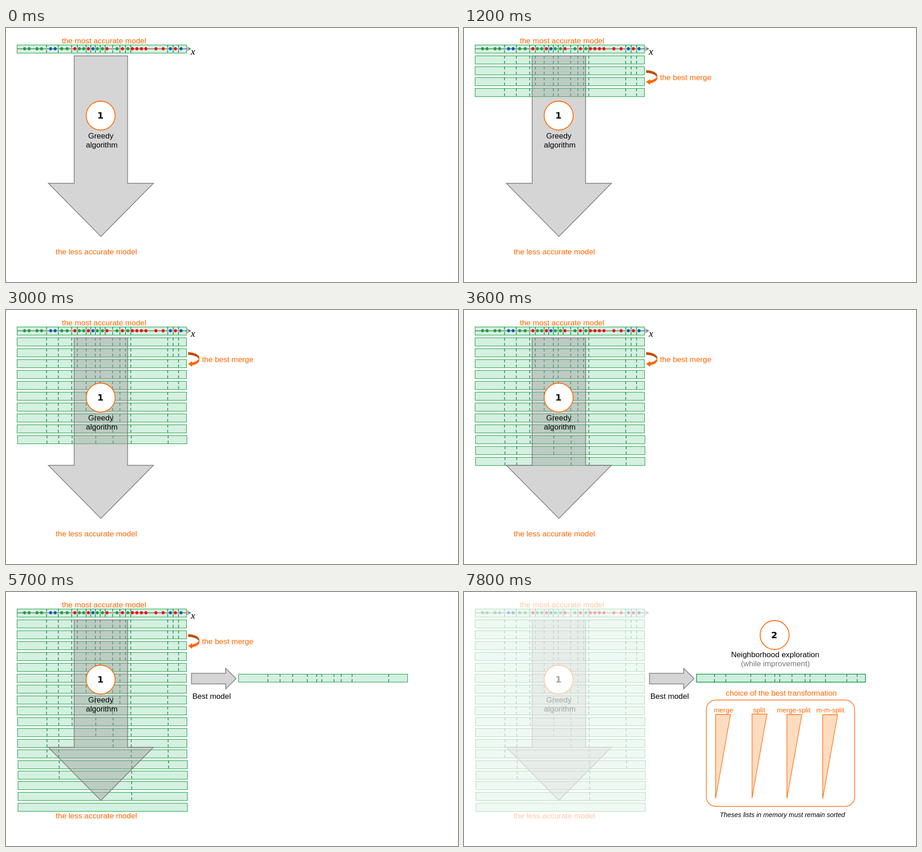
Recreate the animation shown at these times as an HTML page. Size 998 by 561 pixels, loop 8 s.

```html
<!DOCTYPE html>
<html lang="en">
<head>
<meta charset="utf-8">
<title>Greedy merge and neighborhood exploration</title>
<style>
  @property --t { syntax: "<number>"; inherits: true; initial-value: 0; }
  @property --at { syntax: "<number>"; inherits: false; initial-value: -1; }
  @property --to { syntax: "<number>"; inherits: false; initial-value: 9000; }
  @keyframes clock { from { --t: 0; } to { --t: 8000; } }

  html, body { margin: 0; width: 100%; height: 100%; overflow: hidden; background: #fff; }
  svg {
    display: block; width: 100%; height: 100%;
    font: 17px "Liberation Sans", Arial, sans-serif;
    animation: clock 8s linear infinite;
  }
  /* visible from --at until --to, switching hard */
  .step {
    opacity: min(clamp(0, (var(--t) - var(--at)) * 100 + 50, 1),
                 clamp(0, (var(--to) - var(--t)) * 100 - 50, 1));
  }
  .fade { opacity: calc(1 - .65 * clamp(0, (var(--t) - 6000) * 100 + 50, 1)); }

  text { text-anchor: middle; }
  .hot { fill: #ff6600; }
  .num { font: bold 20px "DejaVu Sans", Verdana, sans-serif; }
  .small { font-size: 15px; }
  .ring { fill: #fff; stroke: #ff6600; stroke-width: 1.8; }
  .bar { fill: #d4f0e1; stroke: #22a447; stroke-width: 1.2; }
  .strong { fill: #d0eedf; stroke: #0f9f48; stroke-width: 1.5; }
  .cut { stroke: #128050; stroke-width: 1.5; stroke-dasharray: 6 5; }
  .arrow { fill: rgba(150, 150, 150, .4); stroke: #777; stroke-width: 1.5; }
  .axis { fill: none; stroke: #666; stroke-width: 1.4; }
  .list { fill: #ffdcc0; stroke: #ff6600; stroke-width: 1.3; }
  .panel { fill: none; stroke: #ff6600; stroke-width: 1.4; }
</style>
</head>
<body>
<svg viewBox="0 0 998 561">
  <g class="fade">
    <g id="rows"></g>
    <path class="axis" d="M24 46H407M399.500 41.500L407.500 46L399.500 50.500"/>
    <g id="dots"></g>
    <path class="arrow" d="M150.500 61.500H268.500V343H325.500L209.500 460.500L93.500 343H150.500Z"/>
    <circle class="ring" cx="209" cy="193.500" r="32"/>
    <text class="num" x="208.500" y="200">1</text>
    <text x="209.300" y="244">Greedy</text>
    <text x="211.500" y="263.500">algorithm</text>
    <text class="hot" x="216.500" y="34">the most accurate model</text>
    <text class="hot" x="199.500" y="500">the less accurate model</text>
  </g>

  <text class="step" style="--to:6000;font:italic 22px 'Liberation Serif',serif" x="413" y="58.500">x</text>
  <g class="step" style="--at:900;--to:6000">
    <path fill="#bf4d06" d="M402 93.300A25 12.500 0 0 1 427 105.800V111.500A25 12.500 0 0 0 402 99Z"/>
    <path fill="#ff6600" d="M427 105.800V111.500C426 117 418 121 411 122V125.500L402 119L411 113V116C418 115 425 111 427 105.800Z"/>
    <text class="hot" x="489.500" y="115">the best merge</text>
  </g>

  <g class="step" style="--at:5700">
    <path class="arrow" d="M409.500 179.500H485V168.500L508 191.300L485 214V203H409.500Z"/>
    <text x="454" y="235.500">Best model</text>
    <rect class="bar" x="513.500" y="181.500" width="373" height="17.500"/>
  </g>

  <g class="step" style="--at:6000">
    <rect class="strong" x="513.500" y="181.500" width="373" height="17.500"/>
    <circle class="ring" cx="685.800" cy="95" r="32"/>
    <text class="num" x="685" y="101.500">2</text>
    <text x="687" y="144">Neighborhood exploration</text>
    <text x="687.500" y="164" fill="#777" font-size="16.900">(while improvement)</text>
  </g>
  <g id="cuts"></g>

  <g class="step" id="choice" style="--at:6300">
    <text class="hot" x="700.500" y="229" font-size="16.900">choice of the best transformation</text>
    <rect class="panel" x="535" y="238.500" width="327.500" height="235" rx="21"/>
    <text x="703" y="496.500" font-size="14.500" font-style="italic">Theses lists in memory must remain sorted</text>
  </g>
</svg>

<script>
  const STEP = 300;

  function add(parent, tag, attrs, text) {
    const el = document.createElementNS("http://www.w3.org/2000/svg", tag);
    for (const name in attrs) el.setAttribute(name, attrs[name]);
    if (text) el.textContent = text;
    return document.getElementById(parent.id || parent) ? (
      (parent.id ? parent : document.getElementById(parent)).appendChild(el)) : parent.appendChild(el);
  }

  const cut = (parent, x, y, cls = "cut", style = "") =>
    add(parent, "line", { class: cls, style, x1: x, x2: x, y1: y, y2: y + 18 });

  // each split: position and the last row that still has it
  const splits = [
    [89.5, 13], [115.5, 15], [145, 10], [157.5, 3], [177, 7], [187, 0],
    [197.3, 11], [208, 6], [219, 0], [235.5, 12], [251.5, 8], [264, 4],
    [275.5, 17], [357, 14], [369, 2], [381, 5]
  ];

  for (let i = 0; i <= 18; i++) {
    const y = 37.5 + 24 * i - (i > 12) - (i > 14) - (i > 15);
    const dx = (i > 9) + (i > 13);
    const row = add("rows", "g", i ? { class: "step", style: `--at:${i * STEP}` } : {});
    add(row, "rect", { class: "bar", x: 24.5 + dx, y, width: 374, height: 18 });
    for (const [x, last] of splits) if (i <= last) cut(row, x + dx, y);
  }

  const dots = {
    "#1fa03f": [41, 51, 68.5, 78.5, 123, 135, 162, 171.5, 201.5, 213, 245, 269],
    "#0b5cb5": [98.5, 108.5, 192, 363, 386.5],
    "#ff0000": [152, 182, 223, 257, 279, 289, 299, 309, 331, 347, 374]
  };
  for (const fill in dots)
    for (const cx of dots[fill]) add("dots", "ellipse", { fill, cx, cy: 45.8, rx: 3.2, ry: 3.5 });

  // best model splits: position, first and last moment
  const model = [
    [65], [92, 5700, 6600], [120], [152], [173], [184], [211], [227, 5700, 7200],
    [251], [332], [285, 6900], [240, 7200], [355, 7500], [40, 7800]
  ];
  for (const [x, at = 5700, to = 9000] of model)
    cut("cuts", 513.2 + x, 181.5, "cut step", `--at:${at};--to:${to}`);

  const lists = [
    ["merge", 573, 555.5, 270.5], ["split", 651.5, 636, 269.5],
    ["merge-split", 728, 713, 270.5], ["m-m-split", 808.5, 792, 271]
  ];
  for (const [name, mid, x, y] of lists) {
    add("choice", "text", { class: "hot small", x: mid, y: 266 }, name);
    add("choice", "path", { class: "list", d: `M${x} ${y}h33L${x} ${y + 185.5}Z` });
  }
</script>
</body>
</html>
```
